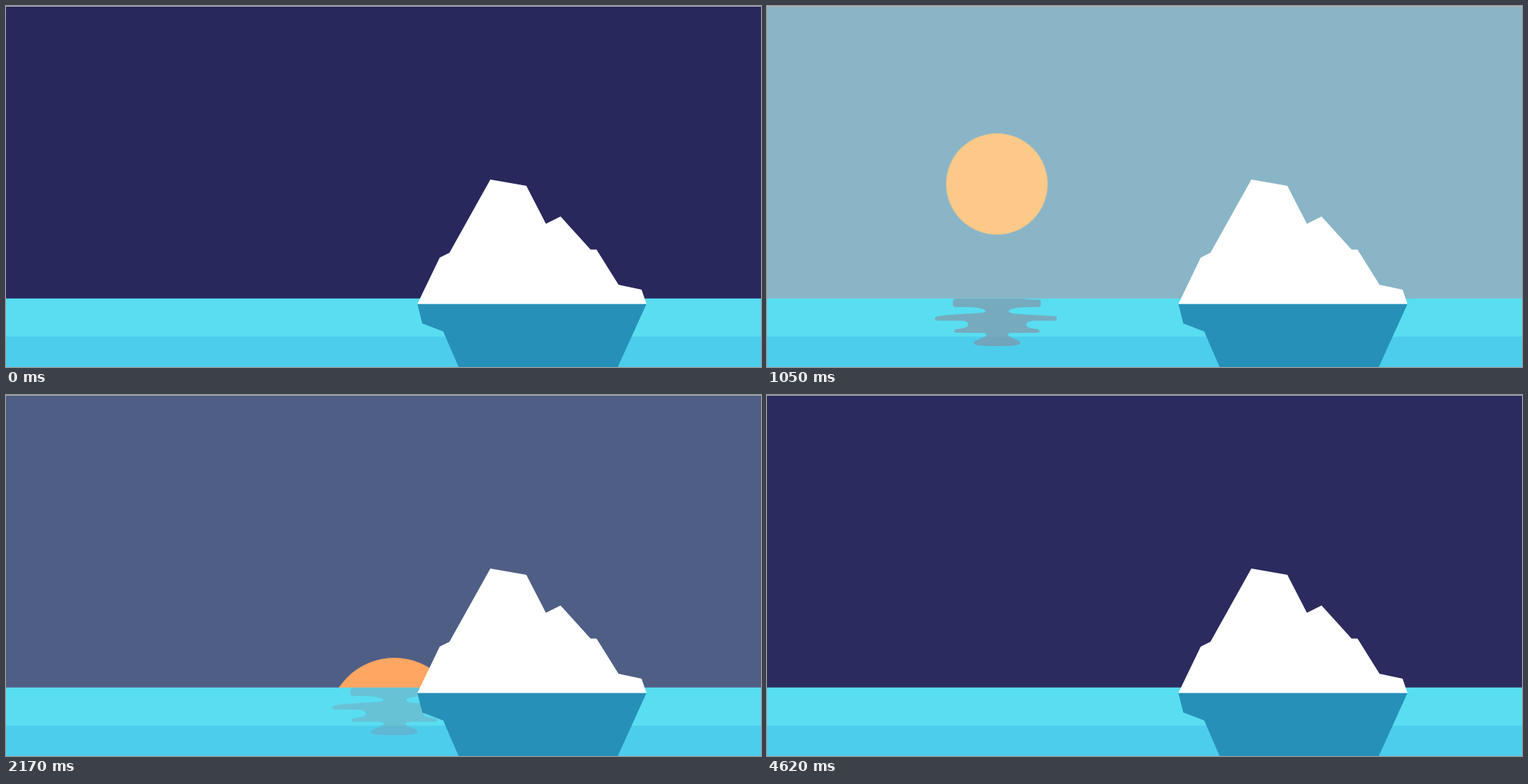
An HTML page without scripts for the animation above (4.76 s loop, 1081 px wide and 518 px high).

```html
<!DOCTYPE html>
<html lang="en">
<head>
<meta charset="utf-8">
<title>Sunset behind an iceberg</title>
<style>
  html, body { margin: 0; height: 100%; overflow: hidden; background: #29285d; }
  svg { display: block; width: 100vw; height: 100vh; }

  /* Short night, hard cut to day, then one decelerating sunset */
  .sky, .sun, .glint {
    --sink: cubic-bezier(.3333, .6129, .6667, .946);
    animation: 4760ms infinite;
  }
  .sky { animation-name: dusk; }
  .sun { animation-name: set; }
  .glint { animation-name: drift; fill: #8b8a9e; }

  @keyframes dusk {
    0% { fill: #29285d; animation-timing-function: step-end; }
    1.47% { fill: #b6f5f5; animation-timing-function: var(--sink); }
    100% { fill: #2c2b5f; }
  }
  @keyframes set {
    0% { visibility: hidden; animation-timing-function: step-end; }
    1.47% {
      visibility: visible;
      fill: #fbe3a4;
      transform: translate(162px, 95.5px) scale(1);
      animation-timing-function: var(--sink);
    }
    100% {
      visibility: visible;
      fill: #ff914c;
      transform: translate(690.5px, 601px) scale(1.94);
    }
  }
  @keyframes drift {
    0% { opacity: 0; transform: none; animation-timing-function: step-end; }
    1.47% { opacity: .8; transform: translate(0, 0); animation-timing-function: var(--sink); }
    100% { opacity: .15; transform: translate(528.5px, 0); }
  }
</style>
</head>
<body>
<svg viewBox="0 0 1081 518" preserveAspectRatio="none">
  <rect class="sky" width="1081" height="420"/>
  <circle class="sun" r="56"/>

  <rect y="419.7" width="1081" height="98.3" fill="#59ddf0"/>
  <rect y="474.5" width="1081" height="43.5" fill="#4ccdec"/>
  <path class="glint" d="M104 420H200Q208 421 212 421.5H221Q225 421.5 225 425V428Q225 432 221 432H205
    C190 432 179 435 179 438C179 442 195 442 210 443L244 445Q248 445 248 448Q248 451.500 243 451.500H217
    C208 451.500 204 454 204 457C204 461 211 463 219 463.500Q223 464 223 466.500Q223 469 219 469H185
    C180 469 178 470 178 472C178 475 195 479 195.500 483C196 487 186 488 162 488C139 488 129 487 129 483.500
    C129 479 147 476 147 472C147 470 144 469 140 469H105Q101 469 101 466.500Q101 464 105 463.500
    C113 463 121 461 121 457C121 453 117 451.500 109 451.500H80Q73 451.500 73 448.500
    C73 445 85 443.500 104 442.500C125 441 146 441 146 438C146 435 134 432 121 432H103Q99 432 99 428V425Q99 420 104 420Z"/>

  <path fill="#2790b8" d="M589 427.500H917L876 518H648L626 467L596 455.500Z"/>
  <path fill="#fff" d="M589 427.500L621 361L635 354L693.500 249L745 258L773 312.500L794 302L837 349.500H845.500L877 400L910 407L917 427.500Z"/>
  <rect width="1081" height="1" fill="#b5b3b1"/>
</svg>
</body>
</html>
```
